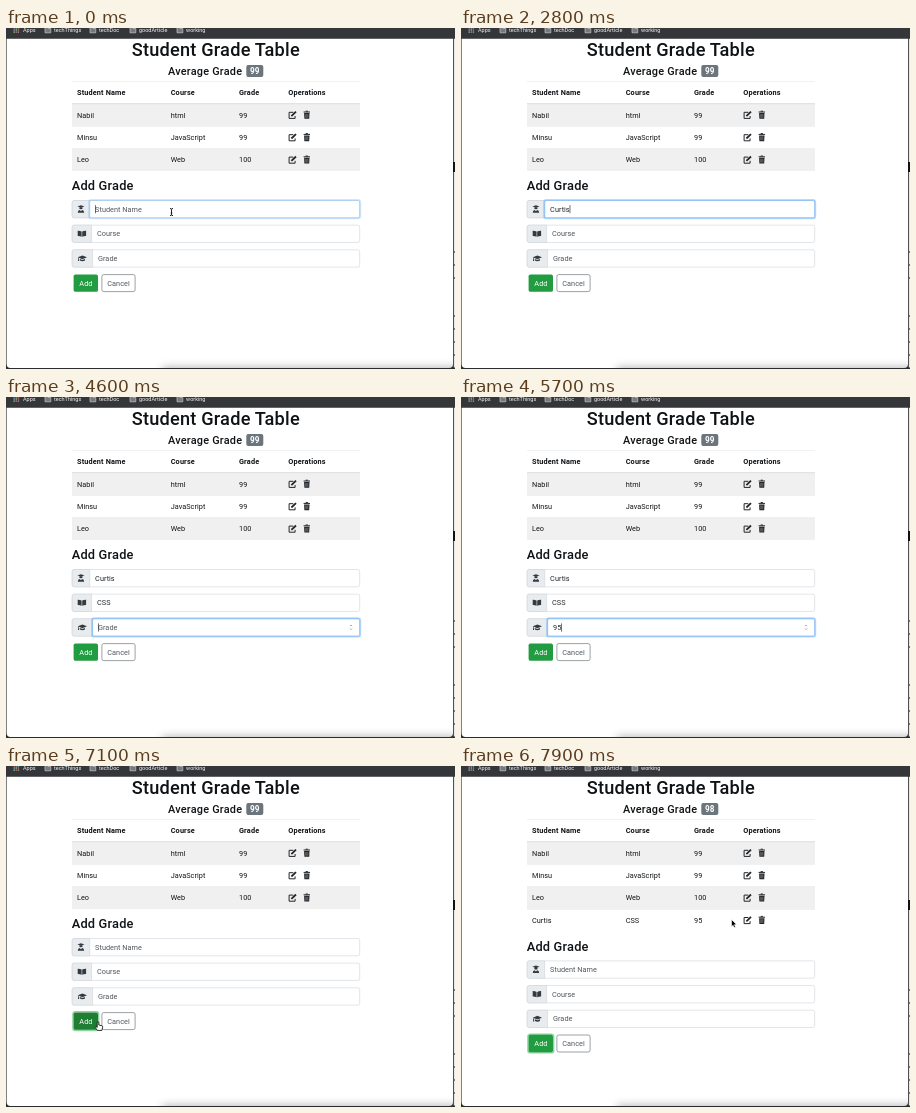
An HTML page that plays this animation: 449x341 px, repeating every 8000 ms.

```html
<!DOCTYPE html>
<html lang="en">
<head>
<meta charset="utf-8">
<title>Student Grade Table</title>
<style>
  html, body { margin: 0; width: 100%; height: 100%; overflow: hidden; background: #fff; }
  svg { display: block; width: 100%; height: 100%; }
  text { font: 400 7.3px Roboto, Inter, sans-serif; fill: #101316; letter-spacing: .005em; white-space: pre; }
  .mid { text-anchor: middle; }
  .bar { font-size: 5.5px; fill: #f4f5f6; letter-spacing: 0; }
  .h1 { font-size: 18.2px; font-weight: 500; letter-spacing: .011em; }
  .h3 { font-size: 12.8px; font-weight: 500; letter-spacing: .015em; }
  .h4 { font-size: 10.9px; font-weight: 500; letter-spacing: .02em; }
  .th { font-weight: 700; letter-spacing: .02em; }
  .badge { font-size: 8.2px; font-weight: 700; fill: #fff; }
  .hint { fill: #50565c; }
  .value { fill: #24282d; }
  .line { fill: none; stroke: #212529; }
</style>
</head>
<body>
<svg id="stage" viewBox="0 0 449 341" preserveAspectRatio="none"></svg>
<script>
const LOOP = 8000, STEP = 100, FADE = 150;
const ROW = 22.4, ROW_TOP = 75.8, FIELD_GAP = 24.65, RIGHT = 353.7;
const CLEARED = 7000, ADDED = 7300;
const GREEN = '#229c40', DARK_GREEN = '#1e7e34';

const students = [
  ['Nabil', 'html', '99'],
  ['Minsu', 'JavaScript', '99'],
  ['Leo', 'Web', '100'],
  ['Curtis', 'CSS', '95'],
];

// focus: start and end; keys: time of each typed character
const fields = [
  { hint: 'Student Name', left: 83.7, focus: [-60, 3010], text: 'Curtis',
    keys: [1200, 1400, 1800, 2000, 2200, 2800], blink: [[400, 900], [2700, 2800]] },
  { hint: 'Course', left: 85.6, focus: [3010, 4440], text: 'CSS',
    keys: [3600, 4100, 4200], blink: [] },
  { hint: 'Grade', left: 86.6, focus: [4440, 6700], text: '95',
    keys: [5500, 5700], blink: [[5000, 5500], [6200, 6700]] },
];

// time, x, y of the pointer's hot spot
const path = [
  [6100, 165.5, 184], [6250, 141, 208], [6400, 105, 241], [6600, 83, 261.5],
  [6900, 86, 259], [7100, 92, 256], [7300, 140, 192], [7500, 201, 149],
  [7700, 201, 149], [7900, 270.5, 153.5],
];

const clamp = v => Math.max(0, Math.min(1, v));
const within = (t, [a, b]) => t >= a && t < b;
const text = (x, y, s, cls = '', id = '') =>
  `<text x="${x}" y="${y}" class="${cls}" ${id && `id="${id}"`}>${s}</text>`;
const rect = (x, y, w, h, fill, more = '') =>
  `<rect x="${x}" y="${y}" width="${w}" height="${h}" fill="${fill}" ${more}/>`;
const at = (x, y, body, id = '') =>
  `<g transform="translate(${x} ${y})" ${id && `id="${id}"`}>${body}</g>`;

const editIcon = `<path class="line" d="M.8-2.7H-3.4V3.4H2.6V1"/>
  <path class="line" stroke-width="1.8" d="M-1.1 1.1 3.5-3.3"/>`;
const trashIcon = `<path class="line" d="M-3.2-3H3.2M-1.1-3.8H1.1"/>
  <path d="M-2.7-2H2.7L2.4 3.8H-2.4Z" fill="#212529"/>
  <path d="M-1.1-1V2.8M0-1V2.8M1.1-1V2.8" stroke="#bbb" stroke-width=".4"/>`;
const fieldIcons = [
  `<path d="M-3.6-2.6 0-3.8 3.6-2.6 0-1.5ZM-1.8-1.6H1.8A1.8 1.9 0 0 1-1.8-1.6ZM-3.2 3.7Q-3.2 1-1.2.9L0 2.2 1.2.9Q3.2 1 3.2 3.7Z"/>`,
  `<path d="M-.3-2.1Q-1.9-3.1-4.2-3V2.4Q-2 2.3-.3 3.2ZM.3-2.1Q1.9-3.1 4.2-3V2.4Q2 2.3.3 3.2Z"/>`,
  `<path d="M-4.6-1 0-2.9 4.6-1 0 .9ZM-2.6.6 0 1.6 2.6.6V2.2Q0 3.7-2.6 2.2ZM-4.1-.6H-3.6L-3.3 2.8H-4.4Z"/>`,
];
const folder = x => `<path d="M${x} -.5h2.2l.8 1h2.8v4.3h-5.8z" fill="#77797d" stroke="#c4c7cb" stroke-width=".7"/>`;

function browser() {
  const dots = [0, 1, 2].flatMap(i => [0, 1, 2].map(j =>
    rect(7.5 + i * 2.1, -.8 + j * 2.1, 1.4, 1.4, ['#d66a5e', '#6fa8dc', '#8fbf7a'][(i + j) % 3])));
  const marks = [[48, 'techThings'], [93, 'techDoc'], [133, 'goodArticle'], [180, 'working']];
  const page = 'M.6 10.5H447V336Q447 340 443 340H4.6Q.6 340 .6 336Z';
  return `<defs><clipPath id="page"><path d="${page}"/></clipPath>
      <filter id="soft" x="-10%" y="-200%" width="120%" height="500%"><feGaussianBlur stdDeviation="4"/></filter></defs>`
    + rect(0, 0, 449, 341, '#2b2c2f')
    + rect(447.8, 10.5, 1.2, 329, '#e6e6e6')
    + rect(447, 134, 2, 10, '#111')
    + [223, 236, 249, 287, 300, 313, 326].map(y => rect(448, y, 1, 2, '#777')).join('')
    + `<path d="${page}" fill="#fff"/>`
    + `<g clip-path="url(#page)">${rect(156, 339, 300, 12, '#000', 'opacity=".28" filter="url(#soft)"')}</g>`
    + rect(0, 0, 449, 10.5, '#35363a')
    + dots.join('') + text(17, 4.2, 'Apps', 'bar')
    + marks.map(([x, s]) => folder(x - 9) + text(x, 4.2, s, 'bar')).join('');
}

function tableRow([name, course, grade], i) {
  const y = ROW_TOP + i * ROW, mid = y + ROW / 2;
  return `<g id="row${i}">`
    + rect(66, y, 288, ROW, i % 2 ? '#fff' : '#f0f0f0')
    + rect(66, y, 288, .5, '#dee2e6')
    + text(71, mid + 2.6, name) + text(164.7, mid + 2.6, course) + text(233, mid + 2.6, grade)
    + at(286.5, mid, editIcon) + at(300.8, mid, trashIcon) + '</g>';
}

function table() {
  const heads = [[71, 'Student Name'], [164.7, 'Course'], [233, 'Grade'], [282.3, 'Operations']];
  return text(209.8, 28.3, 'Student Grade Table', 'h1 mid')
    + text(162, 46.8, 'Average Grade', 'h4')
    + rect(240.3, 37, 17, 12, '#6c757d', 'rx="1.9"')
    + text(248.8, 46, '99', 'badge mid', 'average')
    + rect(66, 53, 288, .5, '#dee2e6')
    + heads.map(([x, s]) => text(x, 66.8, s, 'th')).join('')
    + students.map(tableRow).join('')
    + rect(66, 75, 288, .9, '#dee2e6');
}

function field(f, i) {
  const y = 172.5 + i * FIELD_GAP, w = RIGHT - f.left, x = f.left + 5.4;
  return rect(66.2, y, RIGHT - 66.2, 17.3, '#fff', 'rx="1.9" stroke="#ced4da" stroke-width=".6"')
    + `<path d="M${f.left} ${y}H68.1Q66.2 ${y} 66.2 ${y + 1.9}V${y + 15.4}Q66.2 ${y + 17.3} 68.1 ${y + 17.3}H${f.left}Z"
        fill="#e9ecef" stroke="#ced4da" stroke-width=".6"/>`
    + at((66.2 + f.left) / 2, y + 8.5, `<g fill="#343a40">${fieldIcons[i]}</g>`)
    + `<g id="ring${i}">`
    + rect(f.left - .7, y - .7, w + 1.4, 18.7, 'none', 'rx="2.4" stroke="#007bff" stroke-opacity=".28" stroke-width="1.6"')
    + rect(f.left, y, w, 17.3, 'none', 'rx="1.5" stroke="#80bdff" stroke-width=".7"') + '</g>'
    + text(x, y + 11.2, f.hint, 'hint', 'hint' + i)
    + text(x, y + 11.2, '', 'value', 'value' + i)
    + rect(x, y + 4.6, .6, 8.2, '#111', `id="caret${i}"`);
}

function form() {
  return text(65.7, 162.4, 'Add Grade', 'h3')
    + fields.map(field).join('')
    + `<path id="spinner" class="line" style="stroke:#888;stroke-width:.7" d="M344 229.1 345 228 346 229.1M344 231.5 345 232.6 346 231.5"/>`
    + rect(67, 245.8, 25.6, 18.6, 'none', 'id="addRing" rx="2.4" stroke="#28a745" stroke-opacity=".5" stroke-width="1.6"')
    + rect(67.6, 246.4, 24.4, 17.4, GREEN, 'id="add" rx="1.9"')
    + `<text x="79.9" y="257.7" class="mid" style="fill:#fff">Add</text>`
    + rect(95.9, 246.6, 33.2, 17, '#fff', 'rx="1.9" stroke="#5c6369" stroke-width=".6"')
    + text(112.5, 257.7, 'Cancel', 'hint mid');
}

const pointers = {
  beam: `<path d="M-1.5-3.5Q0-3.5 0-2.6Q0-3.5 1.5-3.5M0-2.6V2.8M-1.5 3.6Q0 3.6 0 2.7Q0 3.6 1.5 3.6M-.8 1H.8" class="line" style="stroke:#000;stroke-width:.85"/>`,
  arrow: `<path d="M0 0V7.2L1.6 5.7 2.7 8.1 4 7.5 2.9 5.2 5 5Z" fill="#000" stroke="#fff" stroke-width=".6"/>`,
  hand: `<path d="M-.8.2Q0-.8.8.2V3L4 3.8Q4.9 4.1 4.7 5.2L3.9 8.4H-.7L-3 5.2Q-2.6 4-1.6 4.8L-.8 5.4Z" fill="#fff" stroke="#000" stroke-width=".8"/>`,
};

document.getElementById('stage').innerHTML =
  browser() + table() + at(0, 0, form(), 'form')
  + at(0, 0, Object.entries(pointers).map(([k, p]) => `<g id="${k}">${p}</g>`).join(''), 'pointer');

const el = {};
document.querySelectorAll('[id]').forEach(n => el[n.id] = n);
const show = (n, on) => n.setAttribute('visibility', on ? 'visible' : 'hidden');
const easeOut = k => 1 - (1 - k) ** 2;
const ramp = (t, from) => easeOut(clamp((t - from) / FADE));
const fade = (t, [a, b]) => ramp(t, a) * (1 - ramp(t, b));

function pointerAt(t) {
  if (t <= path[0][0]) return path[0].slice(1);
  const i = path.findIndex(p => p[0] >= t);
  if (i < 0) return path[path.length - 1].slice(1);
  const [t0, x0, y0] = path[i - 1], [t1, x1, y1] = path[i], k = (t - t0) / (t1 - t0);
  return [x0 + (x1 - x0) * k, y0 + (y1 - y0) * k];
}

function drawField(f, i, t) {
  const typed = t < CLEARED ? f.text.slice(0, f.keys.filter(k => k <= t).length) : '';
  const value = el['value' + i], caret = el['caret' + i];
  value.textContent = typed;
  show(el['hint' + i], !typed);
  el['ring' + i].setAttribute('opacity', fade(t, f.focus));
  show(caret, within(t, f.focus) && !f.blink.some(b => within(t, b)));
  caret.setAttribute('x', f.left + 5.4 + (typed ? value.getComputedTextLength() : 0));
}

function drawPointer(t, shift) {
  const [x, y] = pointerAt(t), fy = y - shift;
  const overField = x > 84 && x < RIGHT
    && fields.some((f, i) => within(fy - 172.5 - i * FIELD_GAP, [0, 17.3]));
  const overAdd = x > 67 && x < 93 && within(fy, [246, 264]);
  const overCancel = x > 95.5 && x < 129.5 && within(fy, [246, 264]);
  const kind = overField ? 'beam' : overAdd || overCancel ? 'hand' : 'arrow';
  const seen = t < 1200 || t >= 6100;
  for (const k in pointers) show(el[k], seen && k === kind);
  el.pointer.setAttribute('transform', `translate(${x} ${y})`);
  el.add.setAttribute('fill', overAdd ? DARK_GREEN : GREEN);
}

function draw(t) {
  const added = t >= ADDED, shift = added ? ROW : 0;
  show(el.row3, added);
  el.average.textContent = added ? '98' : '99';
  el.form.setAttribute('transform', `translate(0 ${shift})`);
  fields.forEach((f, i) => drawField(f, i, t));
  show(el.spinner, within(t, [4500, 6400]));
  el.addRing.setAttribute('opacity', fade(t, [6800, LOOP]));
  drawPointer(t, shift);
}

let start;
function tick(now) {
  start ??= now;
  draw(Math.floor((now - start) % LOOP / STEP) * STEP);
  requestAnimationFrame(tick);
}
draw(0);
requestAnimationFrame(tick);
</script>
</body>
</html>
```
